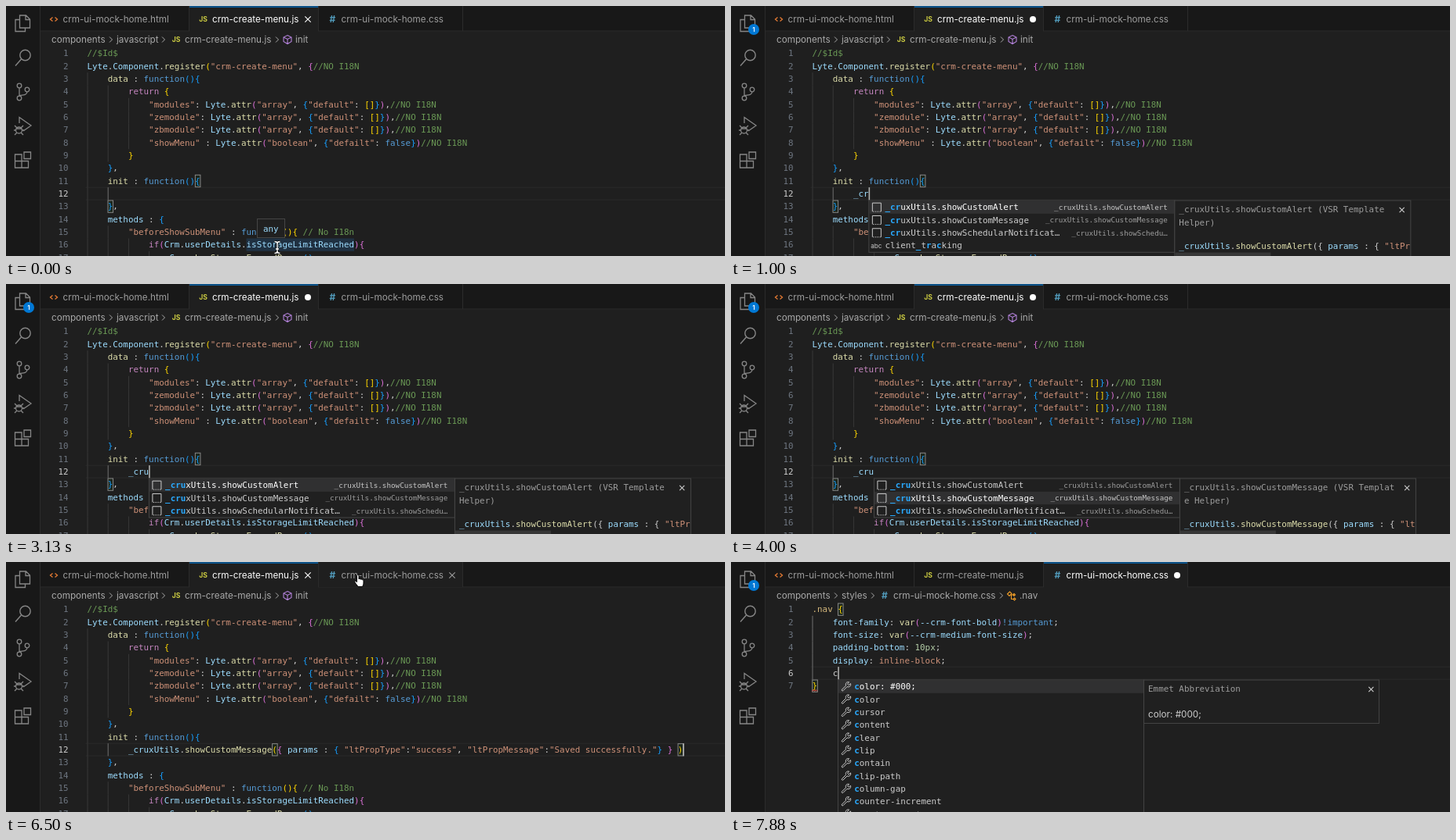
These frames come from a looping animation (917x320 px, 8 s). An HTML page with a canvas:

```html
<!DOCTYPE html>
<html lang="en">
<head>
<meta charset="utf-8">
<title>Code editor</title>
<style>
html, body { margin: 0; width: 100%; height: 100%; overflow: hidden; background: #1f1f1f; }
canvas { display: block; width: 917px; height: 320px; }
</style>
</head>
<body>
<canvas id="stage"></canvas>
<script>
const LOOP = 8000, WIDTH = 917, HEIGHT = 320;
const CW = 6.55, LH = 16.33, LEFT = 103.5, TOP = 52.5, ASC = 11.9;
const MONO = '"DejaVu Sans Mono", monospace', SANS = 'Inter, sans-serif';
const CODE = `10.88px ${MONO}`, BOLD = `bold 10.88px ${MONO}`, NOTE = `9.26px ${MONO}`, UI = `11.7px ${SANS}`;
const PLAIN = '#cccccc', DIM = '#9d9d9d', LINE = '#2b2b2b', EDGE = '#454545', BLUE = '#0078d4';
const VAR = '#9cdcfe', STR = '#ce9178', FN = '#dcdcaa', KEY = '#569cd6', FLOW = '#c586c0';
const PAIRS = ['#ffd700', '#da70d6', '#179fff'];

const canvas = document.getElementById('stage');
const g = canvas.getContext('2d');
const dpr = window.devicePixelRatio || 1;
canvas.width = WIDTH * dpr;
canvas.height = HEIGHT * dpr;

const jsRules = [
  [/\/\/.*/y, '#6a9955'], [/"[^"]*"/y, STR], [/(return|if)\b/y, FLOW],
  [/(function|false)\b/y, KEY], [/\w+(?=\(| : f)/y, FN], [/\w+/y, VAR]
];
const cssRules = [
  [/\.nav/y, '#d7ba7d'], [/--[\w-]+/y, VAR], [/!important/y, KEY], [/\d+px/y, '#b5cea8'],
  [/[\w-]+(?=:)/y, VAR], [/var/y, FN], [/[\w-]{2,}/y, STR]
];

const jsLines = `//$Id$
Lyte.Component.register("crm-create-menu", {//NO I18N
    data : function(){
        return {
            "modules": Lyte.attr("array", {"default": []}),//NO I18N
            "zemodule": Lyte.attr("array", {"default": []}),//NO I18N
            "zbmodule": Lyte.attr("array", {"default": []}),//NO I18N
            "showMenu" : Lyte.attr("boolean", {"defailt": false})//NO I18N
        }
    },
    init : function(){
        
    },
    methods : {
        "beforeShowSubMenu" : function(){ // No I18n
            if(Crm.userDetails.isStorageLimitReached){
                Crm.showStorageExceedPopup();`.split('\n');
const cssLines = `.nav {
    font-family: var(--crm-font-bold)!important;
    font-size: var(--crm-medium-font-size);
    padding-bottom: 10px;
    display: inline-block;
}`.split('\n');
const snippet = '_cruxUtils.showCustomMessage({ params : { "ltPropType":"success", "ltPropMessage":"Saved successfully."} } )';
const cssWords = ['color: #000;', 'color', 'cursor', 'content', 'clear', 'clip', 'contain', 'clip-path',
  'column-gap', 'counter-increment', 'counter-reset'];

const typing = [[0, ''], [500, '_'], [750, '_c'], [880, '_cr'], [1130, '_cru'], [4130, snippet]];
const picks = [[0, 0], [2000, 1], [2880, 0], [3750, 1]];
const blinks = [[-600], [500], [750], [880], [1130], [4130], [4750], [5380], [7250], [7500], [7750]];
const mousePath = [[4630, 346, 309], [5000, 384, 147], [5900, 384, 147], [6380, 450, 24], [6750, 450, 24], [7250, 280, 128]];
const SAVED = 5380, SWITCH = 6750, CLICK = 7250, ENTER = 7500, TYPE_C = 7750;

const latest = (steps, t) => steps.filter(s => s[0] <= t).pop();
const colX = c => LEFT + c * CW;
const rowY = n => TOP + (n - 1) * LH;

function text(s, x, y, color = PLAIN, font = CODE, align = 'left') {
  g.font = font;
  g.fillStyle = color;
  g.textAlign = align;
  g.fillText(s, x, y);
}
function box(x, y, w, h, color) {
  g.fillStyle = color;
  g.fillRect(x, y, w, h);
}
function frame(x, y, w, h, fill = '#202020', stroke = EDGE) {
  box(x, y, w, h, fill);
  g.lineWidth = 1;
  g.strokeStyle = stroke;
  g.strokeRect(x, y, w, h);
}
function path(d, color, width = 1, fill) {
  const p = new Path2D(d);
  if (fill) { g.fillStyle = fill; g.fill(p); }
  g.lineWidth = width;
  g.strokeStyle = color;
  g.stroke(p);
}
function dot(x, y, r, color) {
  g.fillStyle = color;
  g.beginPath();
  g.arc(x, y, r, 0, 7);
  g.fill();
}
const cross = (x, y, color = PLAIN, r = 3.7) =>
  path(`M${x - r} ${y - r}L${x + r} ${y + r}M${x - r} ${y + r}L${x + r} ${y - r}`, color, 1.1);
const chevron = x => path(`M${x - 2} 39.5l3.5 3.5-3.5 3.5`, '#a9a9a9', 1);
const ring = (x, y, r) => `M${x + r} ${y}a${r} ${r} 0 1 0 ${-2 * r} 0a${r} ${r} 0 1 0 ${2 * r} 0`;

// Splits code by the rules, colouring brackets by depth.
function paint(s, x, y, rules, depth) {
  for (let i = 0; i < s.length;) {
    let part = s[i], color = PLAIN;
    for (const [re, c] of rules) {
      re.lastIndex = i;
      const m = re.exec(s);
      if (m) { part = m[0]; color = c; break; }
    }
    if ('([{'.includes(part)) color = PAIRS[depth++ % 3];
    else if (')]}'.includes(part)) color = PAIRS[Math.max(0, --depth) % 3];
    if (part !== ' ') text(part, x + i * CW, y, color);
    i += part.length;
  }
  return depth;
}

function editor(lines, rules, row, col, matches, guide, t) {
  box(LEFT - 2, rowY(row) - .5, WIDTH, 1.2, '#282828');
  box(LEFT - 2, rowY(row + 1) - 1, WIDTH, 1.2, '#282828');
  for (const [r, c] of matches) frame(colX(c) + .3, rowY(r) + .5, CW, LH - 1, '#1c261c', '#888888');
  let depth = 0;
  lines.forEach((s, i) => {
    const n = i + 1, y = rowY(n);
    const indent = s.search(/\S|$/);
    for (let c = 0; c < indent; c += 4) {
      const [from, to, at] = guide;
      box(colX(c), y, 1, LH, n >= from && n <= to && c === at ? '#707070' : '#383838');
    }
    text(n, 79.5, y + ASC, n === row ? PLAIN : '#6e7681', CODE, 'right');
    depth = paint(s, LEFT, y + ASC, rules, depth);
  });
  const age = t - latest(blinks, t)[0];
  if (Math.floor(age / 500) % 2 === 0) box(colX(col), rowY(row), 1.6, LH, '#aeafad');
}

function activityBar(dirty) {
  const gray = '#868686';
  box(0, 0, 43, HEIGHT, '#181818');
  box(43, 0, 1, HEIGHT, LINE);
  path('M17.5 12h8l5 5v11h-13zM25 12v5.5h5.5M17 17.5h-5v15h12.5v-4', gray, 1.3);
  path(ring(24.5, 63, 6.7) + 'M19.5 68L12 76.5', gray, 1.4);
  path(ring(17, 102, 2.8) + ring(17, 118, 2.8) + ring(27, 107, 2.8) + 'M17 105v10M27 110c-.5 4-4 4-9.500 4.5', gray, 1.3);
  path('M17 150v-7.5l15 10.5-10 7' + ring(16.5, 159, 4) + 'M12.5 157h8M11 153l3 3M22 153l-3 3M10 159h3M20 159h3M11 165l3-3M22 165l-3-3', gray, 1.3);
  path('M11.5 190h8.5v17h-8.5zM11.5 198.5h17v8.5h-9M23 187h8.5v8.5h-8.5z', gray, 1.3);
  if (dirty) {
    dot(29, 30, 7, BLUE);
    text('1', 29, 33, '#ffffff', `600 8.2px ${SANS}`, 'center');
  }
}

function fileIcon(kind, x, y) {
  if (kind === 'html') path(`M${x - 1.5} ${y - 2.5}l-3 2.5 3 2.5m3-5l3 2.5-3 2.5`, '#e37933', 1.3);
  else if (kind === 'js') text('JS', x, y + 3.2, '#cbcb41', `bold 8.6px ${SANS}`, 'center');
  else text('#', x, y + 4.3, '#519aba', `bold 12px ${SANS}`, 'center');
}

function tabs(active, dirty, hover) {
  const list = [['html', 44, 190, 'crm-ui-mock-home.html', 61, 72.5],
    ['js', 234, 165, 'crm-create-menu.js', 251.5, 263],
    ['css', 399, 184, 'crm-ui-mock-home.css', 416.5, 427.5]];
  box(44, 0, WIDTH, 32, '#181818');
  box(44, 31.5, WIDTH, 1, LINE);
  list.forEach(([kind, x, w, label, iconX, labelX], i) => {
    const on = i === active;
    if (on || i === hover) box(x, 0, w - 1, on ? 33 : 31.5, '#1f1f1f');
    if (on) box(x, .5, w - 1, 1.2, BLUE);
    box(x + w - 1, 0, 1, 32, LINE);
    fileIcon(kind, iconX, 17);
    text(label, labelX, 21, on ? '#ffffff' : DIM, UI);
    const endX = x + w - 14;
    if (on && dirty) dot(endX, 17, 4, '#ffffff');
    else if (on || i === hover) cross(endX, 17, on ? '#ffffff' : DIM);
  });
}

function breadcrumbs(css) {
  const crumb = (s, x) => text(s, x, 47, '#a9a9a9', UI);
  crumb('components', 58);
  chevron(134);
  if (css) {
    crumb('styles', 141);
    chevron(181);
    fileIcon('css', 196, 43);
    crumb('crm-ui-mock-home.css', 207);
    chevron(345);
    path('M352.5 41l3-3 2.5 2.5-3 3zM357 42h4M357.5 42v5.5h3.5M361 40.5l1.5 1.5-1.5 1.5-1.5-1.5zM361.5 46l1.5 1.5-1.5 1.5-1.5-1.5z', '#ee9d28', 1.1);
    crumb('.nav', 368);
  } else {
    crumb('javascript', 141);
    chevron(201);
    fileIcon('js', 217, 43);
    crumb('crm-create-menu.js', 228);
    chevron(346);
    path('M359 37.5l5 2.5v5.5l-5 3-5-3v-5.5zM354 40l5 2.5 5-2.5M359 42.5v6', '#b180d7', 1.1);
    crumb('init', 369);
  }
}

function rowIcon(kind, x, y) {
  if (kind === 'word') text('abc', x - 7.5, y + 3, PLAIN, `8px ${SANS}`);
  else if (kind === 'prop') {
    path(`M${x - 5} ${y + 3.5}l5-5c-1-3 1-5 4-4.5l-2 2.5 1.5 1.5 2.5-2c.8 3-1.5 5-4.5 4l-5 5c-1 1-2.5-.5-1.5-1.5z`, PLAIN, 1);
  } else {
    path(`M${x - 5.5} ${y + 5.5}v-11h11v11`, PLAIN, 1);
    for (let i = 0; i < 4; i++) box(x - 4.5 + i * 2.7, y + 5, 1.3, 1, PLAIN);
  }
}

// Completion list; "hits" are the indices of the matched letters.
function suggestions(x, y, rows, selected) {
  frame(x, y + .5, 390, rows.length * LH + 1, '#202020');
  rows.forEach(({ label, hits, note, kind }, i) => {
    const top = y + 1 + i * LH, base = top + ASC;
    if (i === selected) box(x + .5, top, 389, LH, '#303031');
    rowIcon(kind, x + 10, top + LH / 2);
    [...label].forEach((ch, k) => {
      const hit = hits.includes(k);
      text(ch, x + 20.7 + k * CW, base, hit ? '#2aaaff' : i === selected ? '#ffffff' : PLAIN, hit ? BOLD : CODE);
    });
    if (note) text(note, x + 381, base - .5, i === selected ? '#c8c8c8' : DIM, NOTE, 'right');
  });
}

function jsPopup(typed, selected) {
  const x = colX(8 + typed.length) + .3, y = rowY(13);
  const alert = '_cruxUtils.showCustomAlert', message = '_cruxUtils.showCustomMessage';
  const hits = [...typed].map((_, i) => i);
  const rows = [
    { label: alert, note: alert, hits },
    { label: message, note: message, hits },
    { label: '_cruxUtils.showSchedularNotificat…', note: '_cruxUtils.showSchedu…', hits }
  ];
  if (typed.length < 4) rows.push({ label: 'client_tracking', kind: 'word', hits: [6, 8, 10].slice(0, typed.length) });
  suggestions(x, y, rows, selected);

  const name = rows[selected].label, px = x + 390, tx = px + 5.5;
  const title = name + ' (VSR Template Helper)';
  const cut = selected ? 41 : 40, codeY = y + 62.9;
  frame(px, y + .5, 301, 90);
  text(title.slice(0, cut), tx, y + 15.9, DIM);
  text(title.slice(cut).trim(), tx, y + 32.2, DIM);
  cross(px + 289.8, y + 12.5, PLAIN, 3.1);
  const code = (name + '({ params : { "ltPropType"').slice(0, 45);
  const part = (from, to, color) => text(code.slice(from, to), tx + from * CW, codeY, color);
  const end = name.length;
  part(0, 10, VAR);
  part(10, 11);
  part(11, end, FN);
  part(end, end + 3);
  part(end + 3, end + 9, VAR);
  part(end + 9, end + 14);
  part(end + 14, 45, STR);
  box(px + .5, 315.5, 122, 5, '#373737');
}

function cssPopup() {
  const x = colX(5) + .3, y = rowY(7);
  suggestions(x, y, cssWords.map(label => ({ label, hits: [0], kind: 'prop' })), 0);
  frame(x + 390, y + .5, 300, 55.5);
  text('Emmet Abbreviation', x + 395.5, y + 15.9, DIM);
  text('color: #000;', x + 395.5, y + 48.2, PLAIN, UI);
  cross(x + 679.8, y + 12.5, PLAIN, 3.1);
}

function mouseAt(t) {
  if (t < 380) return [346, 309];
  if (t < mousePath[0][0] || t >= ENTER) return null;
  const i = mousePath.findIndex(p => p[0] > t);
  if (i < 0) return mousePath[mousePath.length - 1].slice(1);
  const [t0, x0, y0] = mousePath[i - 1], [t1, x1, y1] = mousePath[i];
  const u = (t - t0) / (t1 - t0), e = u * u * (3 - 2 * u);
  return [x0 + (x1 - x0) * e, y0 + (y1 - y0) * e];
}
function pointer([x, y]) {
  g.save();
  g.translate(x, y);
  if (y < 32) {
    path('M-2.5-6c0-2 2.5-2 2.5 0v4c1-1 2-.5 2.3 .3 1-.7 2-.2 2.2 .6 1-.3 1.5 .3 1.5 1.2v3c0 2-1 2.5-1.2 4.5h-6c-.5-2-3.3-4-4-6-.4-1.3 1-1.8 2.7 0z', '#000000', 1, '#ffffff');
  } else {
    const beam = 'M-3.5-7.5q3.5 0 3.5 2.5q0-2.5 3.5-2.5M0-5v10M-3.5 7.5q3.5 0 3.5-2.5q0 2.5 3.5 2.5M-2 2h4';
    path(beam, '#000000', 3);
    path(beam, '#ffffff', 1.4);
  }
  g.restore();
}

function jsScene(t) {
  const typed = latest(typing, t)[1], done = typed === snippet;
  const lines = jsLines.slice();
  lines[11] += typed;
  if (t < 380) box(colX(31), rowY(16), 21 * CW, LH, '#203142');
  editor(lines, jsRules, 12, 8 + typed.length, done ? [[12, 36], [12, 115]] : [[11, 21], [13, 4]], [12, 12, 4], t);
  if (t < 380) {
    frame(320.5, 272.5, 35, 24);
    text('any', 328, 289, VAR);
  }
  if (typed && !done) jsPopup(typed, latest(picks, t)[1]);
}

function cssScene(t) {
  const lines = cssLines.slice();
  if (t >= ENTER) lines.splice(5, 0, t < TYPE_C ? '    ' : '    c');
  const end = lines.length;
  const [row, col] = t < CLICK ? [1, 0] : t < ENTER ? [5, 26] : [6, t < TYPE_C ? 4 : 5];
  editor(lines, cssRules, row, col, t < CLICK ? [] : [[1, 5], [end, 0]], [2, end - 1, 0], t);
  if (t >= TYPE_C) {
    path(`M${LEFT} ${rowY(7) + 15}l1.6-2 1.6 2 1.6-2 1.6 2`, '#f14c4c', 1);
    cssPopup();
  }
}

function draw(t) {
  g.setTransform(dpr, 0, 0, dpr, 0, 0);
  box(0, 0, WIDTH, HEIGHT, '#1f1f1f');
  const css = t >= SWITCH, mouse = mouseAt(t);
  const dirty = css ? t >= ENTER : t >= 500 && t < SAVED;
  const hover = mouse && mouse[1] < 32 && mouse[0] > 399 ? 2 : -1;
  (css ? cssScene : jsScene)(t);
  activityBar(dirty);
  tabs(css ? 2 : 1, dirty, hover);
  breadcrumbs(css);
  if (mouse) pointer(mouse);
}

function tick() {
  draw(performance.now() % LOOP);
  requestAnimationFrame(tick);
}
tick();
</script>
</body>
</html>
```
